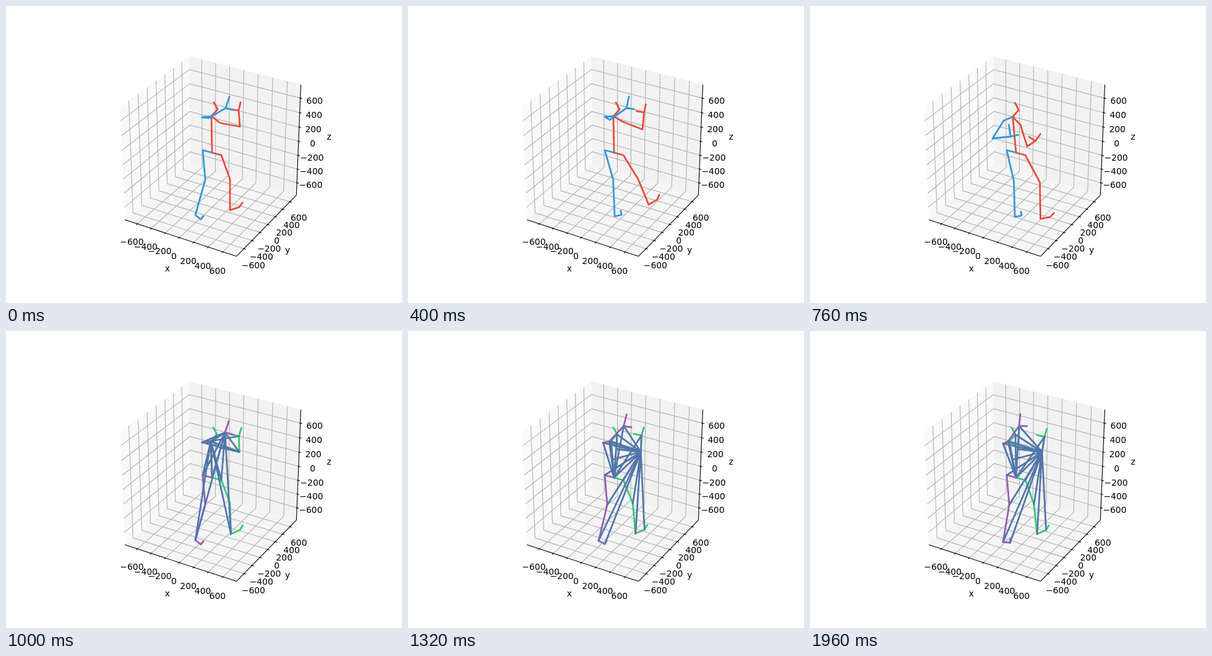
Write an HTML page that moves like this. It is 640 by 480 pixels and loops after 2 s.

```html
<!DOCTYPE html>
<html lang="en">
<head>
<meta charset="utf-8">
<title>Walking skeleton</title>
<style>
  html, body { margin: 0; width: 100%; height: 100%; overflow: hidden; background: #fff; }
  svg { display: block; }
  path { fill: none; }
  text { font: 13.89px "DejaVu Sans", sans-serif; text-anchor: middle; }
  .body path { stroke-width: 2.78; stroke-linecap: square; stroke-linejoin: round; }
</style>
</head>
<body>
<svg id="stage" width="640" height="480" viewBox="0 0 640 480"></svg>
<script>
const stage = document.getElementById('stage');

function add(parent, tag, attrs, text) {
  const el = document.createElementNS('http://www.w3.org/2000/svg', tag);
  for (const key in attrs) el.setAttribute(key, attrs[key]);
  if (text) el.textContent = text;
  return parent.appendChild(el);
}
const toPath = points => 'M' + points.map(p => p.map(v => v.toFixed(2))).join('L');

// Perspective camera: elevation 30, azimuth -60, distance 10, unit cube around 0.
const C = Math.sqrt(3) / 2;
function project([x, y, z]) {
  const k = 1997.8 / (10 - (C / 2 * x - 0.75 * y + 0.5 * z));
  return [333 + k * (C * x + 0.5 * y), 237.4 - k * (-0.25 * x + C / 2 * y + C * z)];
}
const line3d = (points, attrs) => add(stage, 'path', { d: toPath(points.map(project)), ...attrs });
function label(point, text, drop) {
  const [x, y] = project(point);
  add(stage, 'text', { x, y: Math.round(y + drop) }, text);
}

// Axes
const E = 25 / 48, OUT = E + 0.0864, FAR = E + 0.188;
const pane = (fill, ...points) => line3d(points, { style: `fill:${fill};stroke:${fill}` });
pane('#f9f9f9', [-E, -E, -E], [-E, E, -E], [-E, E, E], [-E, -E, E]);
pane('#f2f2f2', [-E, E, -E], [E, E, -E], [E, E, E], [-E, E, E]);
pane('#f5f5f5', [-E, -E, -E], [E, -E, -E], [E, E, -E], [-E, E, -E]);

// edge(t, r): point at t along the axis, r away from the centre line
const axes = [
  { name: 'x', edge: (t, r) => [t, -r, -r], tick: (t, r) => [t, -r, -E],
    grid: t => [[t, -E, -E], [t, E, -E], [t, E, E]] },
  { name: 'y', edge: (t, r) => [r, t, -r], tick: (t, r) => [r, t, -E],
    grid: t => [[E, t, -E], [-E, t, -E], [-E, t, E]] },
  { name: 'z', edge: (t, r) => [r, r, t], tick: (t, r) => [r, E, t],
    grid: t => [[-E, -E, t], [-E, E, t], [E, E, t]] }
];
const thin = color => ({ stroke: color, 'stroke-width': 1.11 });
function eachTick(action) {
  for (const a of axes) for (let v = -600; v <= 600; v += 200) action(a, v, v / 1500);
}
eachTick((a, v, t) => line3d(a.grid(t), thin('#b0b0b0')));
for (const a of axes) {
  line3d([a.edge(-E, E), a.edge(E, E)], thin('#000'));
  label(a.edge(0, FAR), a.name, 4);
}
eachTick((a, v, t) => {
  line3d([a.tick(t, E + 1 / 60), a.tick(t, E - 1 / 120)], thin('#000'));
  label(a.edge(t, OUT), String(v).replace('-', '\u2212'), 11.7);
});

// Resting pose in stage pixels; l and r are the two sides of the body
const rest = {
  hip: [333, 237], neck: [332, 178], head: [342, 167], top: [336, 156],
  lSho: [317, 180], lElb: [328, 181], lWri: [355, 165], lHand: [361, 147], lThu: [367, 168],
  rSho: [346, 189], rElb: [378, 195], rWri: [376, 169], rHand: [379, 156], rThu: [364, 167],
  lHip: [318, 233], lKnee: [322, 281], lAnk: [306, 338], lToe: [315, 345], lEnd: [319, 340],
  rHip: [348, 241], rKnee: [362, 280], rAnk: [362, 330], rToe: [377, 325], rEnd: [382, 318]
};

// Shifts joints and turns them (in degrees) about the first one named
function move(pose, names, dx, dy, turn = 0) {
  const list = names.split(' '), [px, py] = pose[list[0]];
  const c = Math.cos(turn * Math.PI / 180), s = Math.sin(turn * Math.PI / 180);
  for (const j of list) {
    const x = pose[j][0] - px, y = pose[j][1] - py;
    pose[j] = [px + dx + x * c - y * s, py + dy + x * s + y * c];
  }
}
const TORSO = 'neck head top';
const hand = s => `${s}Wri ${s}Hand ${s}Thu`;
const foot = s => `${s}Ank ${s}Toe ${s}End`;

// A step forward (s), then the arms and the front foot come down (d)
function walk(p, t) {
  const s = Math.min(1, t / 400);
  const d = Math.max(0, Math.min(t, 760) - 400 + 0.3 * Math.max(0, t - 760)) / 360;
  move(p, TORSO, -4.5 * d, d);
  move(p, 'lSho', s - 5 * d, 6.5 * d - s);
  move(p, 'lElb', -2 * s - 31 * d, 3 * s + 30 * d);
  move(p, hand('l'), -2 * s - 29 * d, 46 * d, -6 * s - 20 * d);
  move(p, 'rSho', s - 7 * d, 5 * d - 2 * s);
  move(p, 'rElb', s - 28 * d, 4.5 * s + 27.5 * d);
  move(p, hand('r'), 5.5 * s - 17 * d, 3 * s + 46 * d, 22 * d);
  move(p, 'lKnee', 9.5 * s - 2 * d, 3 * d - s);
  move(p, foot('l'), 28 * s - 3 * d, 2 * s + d, -50 * s);
  move(p, 'rKnee', 9.5 * s, 6 * d - s);
  move(p, foot('r'), 27 * s - 16.5 * d, 23 * d - 9 * s, 20 * d - 12 * s);
}

// A slow lean (u) with a quicker first reaction (a)
function lean(p, t) {
  const u = t / 960, a = Math.min(1, 3 * u);
  move(p, TORSO, -1 - 9 * u, 0.5 * u);
  move(p, 'lSho', -5 * u, 2 * u);
  move(p, 'lElb', -8 * u, -2.5 * a);
  move(p, hand('l'), -1 - 16 * u, -1 - 10.5 * a, -13 * u);
  move(p, 'rSho', -6 * a - 2 * u, 2 * a);
  move(p, 'rElb', -1 - 2 * u, 0.5);
  move(p, hand('r'), 0.5 + 2.5 * u, 1 - 2 * a + 3 * u, 3);
  move(p, foot('l'), 6 * u, 3 * u, -32 * u);
  move(p, 'rKnee', 2 * a - 2 * u, -2 * (1 - u));
  move(p, foot('r'), 1.5 + 4.5 * a - u, u - 2 - a, -5);
}

// Bones and links
const limb = s => ['hip Hip Knee Ank Toe End', 'neck Sho Elb Wri Hand', 'Wri Thu']
  .map(c => c.replace(/\b[A-Z]/g, m => s + m));
const split = list => list.map(c => c.split(' '));
const right = split([...limb('r'), 'hip spine neck head top']);
const left = split(limb('l'));
const fan = (hub, ends) => ends.split(' ').map(e => [hub, e]);
const ARMS = 'lSho lElb neck head lWri rWri';
const LEGS = 'lHip hip rHip lAnk rAnk';
const firstLinks = [
  ...fan('lWri', LEGS + ' lSho neck rElb'),
  ...fan('neck', LEGS + ' lSho rWri rElb'),
  ...fan('lSho', 'rElb')];
const laterLinks = [
  ...fan('rElb', `${ARMS} ${LEGS} rSho spine lKnee rKnee lToe rToe`),
  ...fan('hip', ARMS)];

const body = add(stage, 'g', { class: 'body' });
const rightEl = add(body, 'path'), leftEl = add(body, 'path');
const linkEl = add(body, 'path', { stroke: '#5276ab' });

function draw(now) {
  const t = Math.floor(now % 2000 / 40) * 40;
  const p = { ...rest }, linked = t >= 1000;
  if (linked) lean(p, t - 1000); else walk(p, t);
  p.spine = p.neck.map((v, i) => (v + p.hip[i]) / 2);

  const trace = chains => chains.map(c => toPath(c.map(j => p[j]))).join('');
  rightEl.setAttribute('d', trace(right));
  rightEl.setAttribute('stroke', linked ? '#2ecc71' : '#e74c3c');
  leftEl.setAttribute('d', trace(left));
  leftEl.setAttribute('stroke', linked ? '#9b59b6' : '#3498db');
  linkEl.setAttribute('d', linked ? trace(t < 1160 ? firstLinks : laterLinks) : '');
}

const begin = performance.now();
function loop() {
  draw(performance.now() - begin);
  requestAnimationFrame(loop);
}
loop();
</script>
</body>
</html>
```
